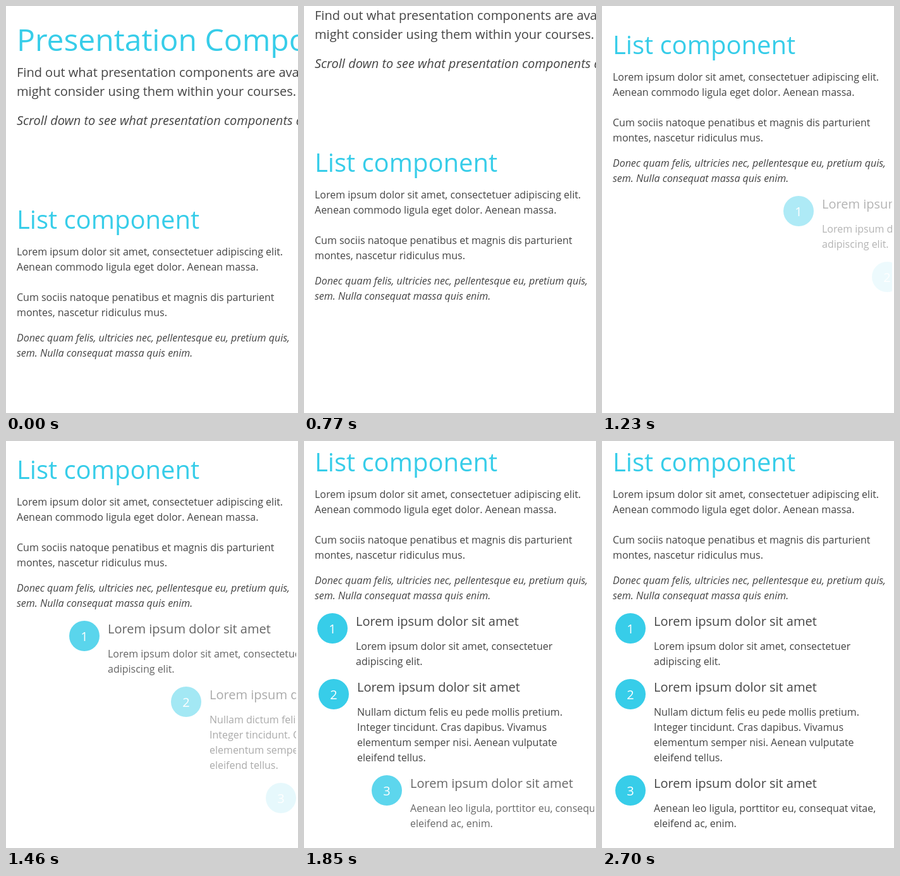
Animation, 462 px wide and 643 px high, one loop 4.24 s. Source, as an HTML page:

```html
<!DOCTYPE html>
<html lang="en">
<head>
<meta charset="utf-8">
<title>List component</title>
<style>
  html, body { margin: 0; width: 100%; height: 100%; overflow: hidden; background: #fff; }
  svg { display: block; width: 100%; height: 100%; font-family: "Open Sans", sans-serif; fill: #444; }
  .accent { fill: #37cde9; }
  .italic { font-style: italic; }
  .number { fill: #fff; text-anchor: middle; }
</style>
</head>
<body>
<svg viewBox="0 0 462 643">
  <defs><clipPath id="listArea"><rect x="0" y="0" width="459" height="1000"/></clipPath></defs>
  <g id="page"><g id="list" clip-path="url(#listArea)"></g></g>
</svg>
<script>
const LOOP = 4240;
const SLIDE = 800, STAGGER = 200, FIRST = 882, LIST_WIDTH = 442;
const LEFT = 17, ITEM_LEFT = 82;
const page = document.getElementById("page");
const list = document.getElementById("list");

function add(parent, tag, attrs, content = "") {
  const node = document.createElementNS("http://www.w3.org/2000/svg", tag);
  for (const name in attrs) node.setAttribute(name, attrs[name]);
  node.textContent = content;
  parent.appendChild(node);
  return node;
}

function text(parent, x, y, size, content, style = "") {
  return add(parent, "text", { x, y, "font-size": size, class: style }, content);
}

text(page, LEFT, 71, 48, "Presentation Components", "accent");
text(page, LEFT, 112, 20, "Find out what presentation components are available and how you");
text(page, LEFT, 142, 20, "might consider using them within your courses.");
text(page, LEFT, 188, 20, "Scroll down to see what presentation components are available.", "italic");
text(page, LEFT, 352, 40, "List component", "accent");
text(page, LEFT, 394, 16, "Lorem ipsum dolor sit amet, consectetuer adipiscing elit.");
text(page, LEFT, 418, 16, "Aenean commodo ligula eget dolor. Aenean massa.");
text(page, LEFT, 466, 16, "Cum sociis natoque penatibus et magnis dis parturient");
text(page, LEFT, 490, 16, "montes, nascetur ridiculus mus.");
text(page, LEFT, 530, 16, "Donec quam felis, ultricies nec, pellentesque eu, pretium quis,", "italic");
text(page, LEFT, 554, 16, "sem. Nulla consequat massa quis enim.", "italic");

const items = [
  [600, ["Lorem ipsum dolor sit amet, consectetuer", "adipiscing elit."]],
  [704, ["Nullam dictum felis eu pede mollis pretium.", "Integer tincidunt. Cras dapibus. Vivamus",
         "elementum semper nisi. Aenean vulputate", "eleifend tellus."]],
  [856, ["Aenean leo ligula, porttitor eu, consequat vitae,", "eleifend ac, enim."]]
].map(([y, lines], i) => {
  const item = add(list, "g", {});
  add(item, "circle", { cx: 45, cy: y, r: 24, class: "accent" });
  text(item, 45, y + 8, 20, i + 1, "number");
  text(item, ITEM_LEFT, y - 4, 20, "Lorem ipsum dolor sit amet");
  lines.forEach((line, n) => text(item, ITEM_LEFT, y + 34 + 24 * n, 16, line));
  return item;
});

// The picture holds still between these moments.
const ticks = [0, 610, 690, 770, 840, 920, 1000, 1070, 1150, 1230, 1310, 1380,
               1460, 1540, 1620, 1700, 1770, 1850, 1930, 2010, 2080, 2160];

// Scroll keys: time, offset, speed in px per ms.
const scrollKeys = [[540, 0, 0], [610, 14, .4], [770, 90, .55],
                    [1230, 276, .12], [1620, 297, .035], [1850, 304, 0]];

function scrollAt(t) {
  if (t <= scrollKeys[0][0]) return 0;
  const next = scrollKeys.findIndex(key => key[0] >= t);
  if (next < 0) return 304;
  const [t0, y0, v0] = scrollKeys[next - 1];
  const [t1, y1, v1] = scrollKeys[next];
  const span = t1 - t0, s = (t - t0) / span, r = 1 - s;
  return y0 * r * r * (1 + 2 * s) + y1 * s * s * (3 - 2 * s)
       + span * s * r * (v0 * r - v1 * s);
}

function swing(u) {
  return .5 - Math.cos(Math.PI * Math.min(1, Math.max(0, u))) / 2;
}

function draw(time) {
  const t = ticks.filter(tick => tick <= time).pop();
  page.setAttribute("transform", `translate(0 ${-Math.round(scrollAt(t))})`);
  items.forEach((item, i) => {
    const shown = swing((t - FIRST - STAGGER * i) / SLIDE);
    item.setAttribute("transform", `translate(${Math.round(LIST_WIDTH * (1 - shown))} 0)`);
    item.setAttribute("opacity", shown);
  });
}

const start = performance.now();
function frame() {
  draw((performance.now() - start) % LOOP);
  requestAnimationFrame(frame);
}
frame();
</script>
</body>
</html>
```
